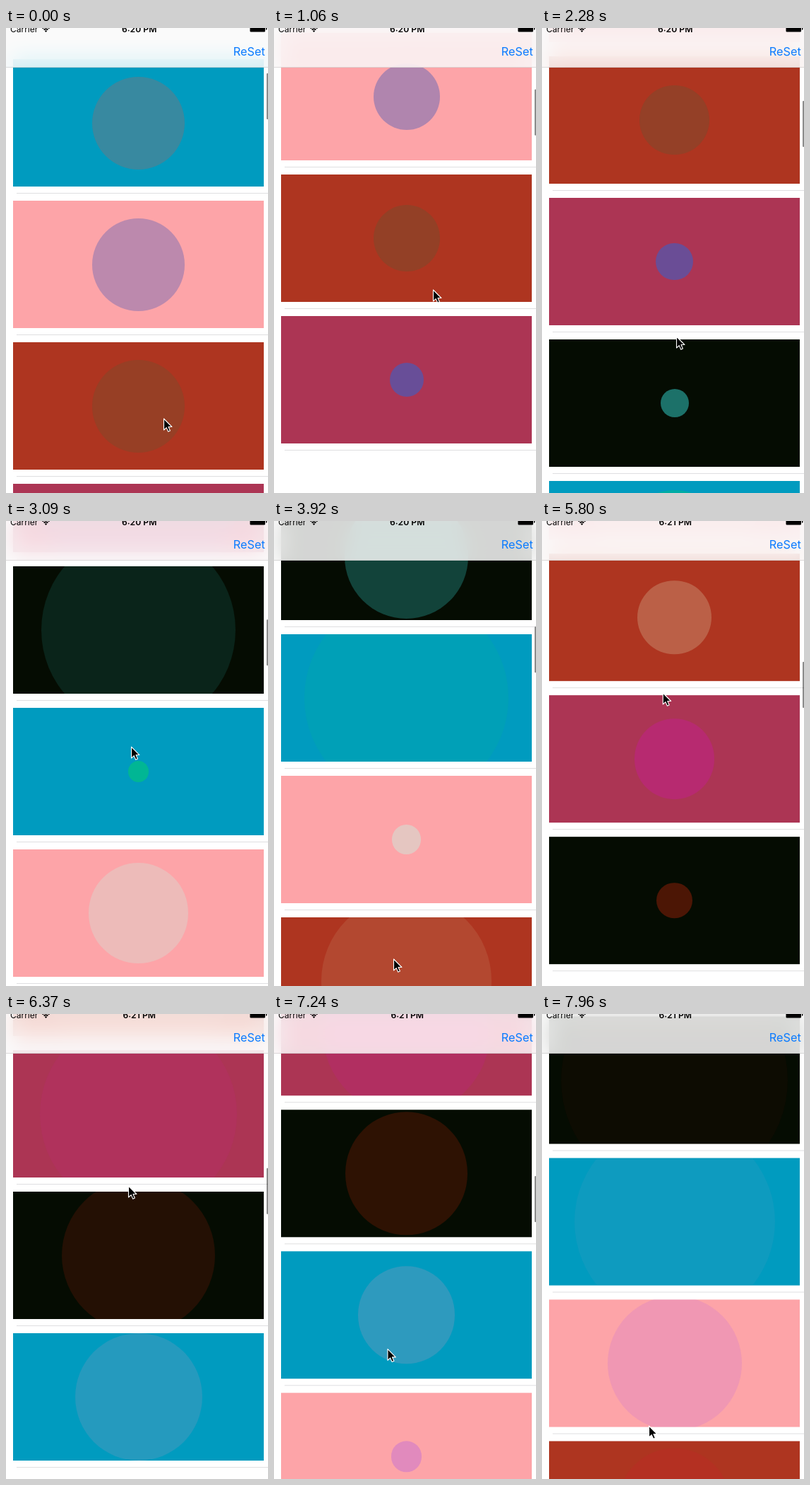
These frames come from a looping animation (371 by 657 pixels, 8000 ms). An HTML page:

```html
<!DOCTYPE html>
<html lang="en">
<head>
<meta charset="utf-8">
<title>Pulsing list</title>
<style>
  html, body { margin: 0; width: 100%; height: 100%; overflow: hidden; background: #fff; }
  #stage { position: relative; width: 371px; height: 657px; overflow: hidden; background: #fff; }
  #list { position: absolute; left: 0; top: 0; }
  .cell { position: absolute; left: 0; width: 371px; height: 200px; }
  .cell::after { content: ""; position: absolute; left: 15px; right: 0; top: 199px; height: 1px; background: #dfdfe1; }
  .card { position: absolute; left: 10px; top: 10px; width: 355px; height: 180px; overflow: hidden; }
  .pulse { position: absolute; border-radius: 50%; }
  #nav {
    position: absolute; left: 0; top: 0; width: 371px; height: 55px;
    background: rgba(250, 250, 250, .85);
    -webkit-backdrop-filter: blur(14px) saturate(1.6);
    backdrop-filter: blur(14px) saturate(1.6);
    border-bottom: 1px solid rgba(0, 0, 0, .12);
  }
  #bar { position: absolute; left: 369px; top: 64px; width: 2px; height: 65px; border-radius: 1px 0 0 1px; background: rgba(0, 0, 0, .45); }
  svg { position: absolute; left: 0; top: 0; font-family: Inter, sans-serif; }
</style>
</head>
<body>
<div id="stage">
  <div id="list"></div>
  <div id="bar"></div>
  <div id="nav"></div>
  <svg width="371" height="657" viewBox="0 0 371 657">
    <text x="6" y="5.5" font-size="12">Carrier</text>
    <g fill="none" stroke="#000" stroke-width="1.8">
      <path d="M51.5 .6Q56.5 -3.6 61.5 .6M53.6 2.6Q56.5 .2 59.4 2.6"/>
    </g>
    <path d="M54.8 4L56.5 6L58.2 4Q56.5 2.6 54.8 4Z"/>
    <text id="clock" x="188.7" y="5.5" font-size="12.2" font-weight="600" text-anchor="middle">6:20 PM</text>
    <path d="M345.5 -4H367V4.3Q367 5.5 365.8 5.5H346.7Q345.5 5.5 345.5 4.3ZM368 -1Q369.6 0 369.6 1.2T368 3Z"/>
    <text x="366.8" y="39" font-size="16.3" text-anchor="end" fill="#0a7bff">ReSet</text>
    <path id="cursor" d="M0 0V16L3.7 12.6L6.2 18.2L8.9 17L6.5 11.5H11.4Z" stroke="#fff" stroke-width="1.1" stroke-linejoin="round"/>
  </svg>
</div>
<script>
const LOOP = 8000, PITCH = 200, FIRST_TOP = 34, MAX_RADIUS = 180, POP_MS = 300;
const $ = id => document.getElementById(id);

const CARD_COLORS = ['#009bbf', '#fda4a8', '#ae3520', '#ac3554', '#050c02'];

// [pulse colour, radius at time zero, time the cell pops in]
const CELLS = [
  ['153,106,106', 65.5, -999],
  ['74,92,182', 65.5, -999],
  ['111,79,48', 65.5, -999],
  ['42,102,216', 42.5, -999],
  ['50,203,199', 36.2, 1000],
  ['2,205,111', 93.2, 1850],
  ['207,229,218', 149.2, 2590],
  ['204,158,127', 69.2, 3120],
  ['199,26,154', 73.7, 4310],
  ['146,32,9', 42.3, 4480],
  ['132,151,187', 24.2, 5780],
  ['200,115,210', 157.2, 6280],
  ['190,40,40', 142, 7410]
];

// Runs of redraws: [first time, last time, count]
const RUNS = [
  [60, 330, 4], [470, 1270, 9], [1360, 2110, 8], [2200, 2280, 2],
  [2490, 3180, 7], [3300, 4030, 8], [4120, 4240, 2], [4420, 5140, 8],
  [5230, 6010, 9], [6100, 6220, 2], [6370, 7150, 9], [7240, 7960, 8]
];
const redraws = [0];
for (const [from, to, n] of RUNS)
  for (let i = 0; i < n; i++) redraws.push(from + (to - from) * i / (n - 1));

// Smooth curve through [time, value] points without overshoot
function curve(points) {
  const slope = i => (points[i + 1][1] - points[i][1]) / (points[i + 1][0] - points[i][0]);
  const tangent = points.map((_, i) => {
    if (i === 0 || i === points.length - 1) return 0;
    const a = slope(i - 1), b = slope(i);
    return a * b > 0 ? 2 * a * b / (a + b) : 0;
  });
  return t => {
    if (t <= points[0][0]) return points[0][1];
    const i = points.findIndex(p => p[0] > t) - 1;
    if (i < 0) return points[points.length - 1][1];
    const [t0, v0] = points[i], [t1, v1] = points[i + 1];
    const h = t1 - t0, u = (t - t0) / h, w = 1 - u;
    return v0 * (1 + 2 * u) * w * w + v1 * u * u * (3 - 2 * u)
      + h * u * w * (tangent[i] * w - tangent[i + 1] * u);
  };
}

const scroll = curve([
  [60, 0], [330, 18], [500, 45], [955, 178], [1070, 237], [1270, 300], [1500, 344], [1850, 379], [2280, 404],
  [2400, 404], [2590, 577], [2800, 690], [3120, 793], [3500, 854], [3920, 884],
  [4240, 884], [4310, 977], [4480, 1177], [4620, 1270], [4780, 1302.5],
  [5600, 1302.5], [5780, 1377], [5980, 1510], [6200, 1577], [6370, 1593],
  [6900, 1593], [7410, 1777], [7700, 1840.5]
]);
const growth = curve([
  [0, 0], [1070, 161.5], [2280, 343.8], [3926, 591.8], [5037, 764.8], [6370, 965.8], [7960, 1197.8]
]);
const cursorX = curve([[0, 223], [1070, 225], [2280, 190], [3926, 169], [5037, 167], [6370, 173], [7960, 151]]);
const cursorY = curve([
  [60, 552], [955, 374], [1070, 370], [1300, 370], [1900, 436], [2400, 436], [2590, 270], [2900, 270],
  [3600, 619], [4240, 619], [4500, 354], [5600, 354], [5800, 243], [6500, 243],
  [7050, 560], [7410, 400], [7600, 400], [7960, 582]
]);
const barOpacity = curve([[4780, 1], [4980, 0], [5600, 0], [5650, 1], [7700, 1], [7900, 0]]);

function addDiv(parent, className) {
  const el = document.createElement('div');
  el.className = className;
  return parent.appendChild(el);
}

const cells = CELLS.map(([rgb, radius, start], i) => {
  const el = addDiv($('list'), 'cell');
  const card = addDiv(el, 'card');
  const pulse = addDiv(card, 'pulse');
  el.style.top = FIRST_TOP + PITCH * i + 'px';
  card.style.background = CARD_COLORS[i % CARD_COLORS.length];
  pulse.style.background = `rgb(${rgb})`;
  return { el, pulse, radius, start };
});

function drawCell({ el, pulse, radius, start }, t) {
  const u = Math.min(1, Math.max(0, (t - start) / POP_MS));
  el.style.visibility = u > 0 ? 'visible' : 'hidden';
  el.style.transform = u < 1 ? `scale(${.1 + .9 * u * u * (3 - 2 * u)})` : 'none';

  const r = (radius + growth(t)) % MAX_RADIUS;
  pulse.style.left = 177.5 - r + 'px';
  pulse.style.top = 90 - r + 'px';
  pulse.style.width = pulse.style.height = 2 * r + 'px';
  pulse.style.opacity = .6 * Math.pow(1 - r / MAX_RADIUS, 1.1);
}

function draw(t) {
  const y = scroll(t);
  $('list').style.transform = `translateY(${-y}px)`;
  cells.forEach(cell => drawCell(cell, t));
  $('bar').style.transform = `translateY(${y * .0965}px)`;
  $('bar').style.opacity = barOpacity(t);
  $('cursor').setAttribute('transform', `translate(${cursorX(t) + .5} ${cursorY(t)})`);
  $('clock').textContent = t < 5700 ? '6:20 PM' : '6:21 PM';
}

const begin = performance.now();
function tick() {
  const now = (performance.now() - begin) % LOOP;
  draw(redraws.filter(t => t <= now + 15).pop());
  requestAnimationFrame(tick);
}
tick();
</script>
</body>
</html>
```
